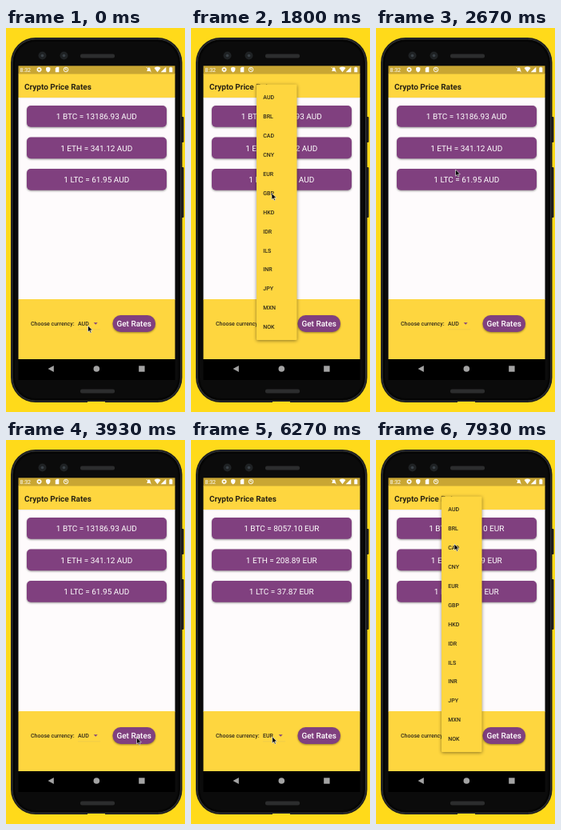
Recreate the animation shown at these times as an HTML page. Size 224 by 480 pixels, loop 8000 ms.

```html
<!DOCTYPE html>
<html lang="en">
<head>
<meta charset="utf-8">
<title>Crypto Price Rates</title>
<style>
  html, body { margin: 0; width: 100%; height: 100%; overflow: hidden; background: #ffda1a; }
  svg { display: block; width: 100vw; height: 100vh; }
  text { font-family: Roboto, Arial, sans-serif; text-rendering: geometricPrecision; }
  .rate { font-size: 10px; fill: #fff; text-anchor: middle; }
  .item { font-size: 7px; font-weight: 500; fill: #2b2618; }
  .card { filter: drop-shadow(0 1px 1.2px rgba(0, 0, 0, .4)); }
  #menu { filter: drop-shadow(0 1.5px 2px rgba(0, 0, 0, .45)); }
</style>
</head>
<body>
<svg viewBox="0 0 224 480">
  <!-- phone body -->
  <g id="phone">
    <rect x="218" y="111" width="4.500" height="32" rx="1" fill="#1c1c1c"/>
    <rect x="218" y="174" width="4.500" height="63" rx="1" fill="#1c1c1c"/>
    <rect x="6" y="12" width="214.500" height="456" rx="31" fill="#1b1c1d"/>
    <rect x="8" y="14" width="210.500" height="452" rx="29" fill="#050505" stroke="#3c3e40" stroke-width=".8"/>
    <rect x="11" y="17" width="204.500" height="446" rx="26" fill="#0b0b0b"/>
    <rect x="102" y="467" width="22" height="1.500" fill="#ffda1a"/>
    <rect x="93" y="32.500" width="43" height="5" rx="2" fill="#2c2d2e"/>
    <rect x="93" y="451.500" width="43" height="5" rx="2" fill="#2c2d2e"/>
    <g fill="#1f2224">
      <circle cx="45.500" cy="34.500" r="5"/>
      <circle cx="72.500" cy="34.500" r="5"/>
    </g>
    <g fill="#3a4147">
      <circle cx="45.500" cy="34.500" r="1.800"/>
      <circle cx="72.500" cy="34.500" r="1.800"/>
    </g>
  </g>

  <!-- app surfaces -->
  <rect x="15.500" y="47.300" width="196" height="10.500" fill="#c9a633"/>
  <rect x="15.500" y="57.300" width="196" height="30" fill="#fed63f"/>
  <rect x="15.500" y="87" width="196" height="252.500" fill="#fefbfc"/>
  <rect x="15.500" y="87" width="196" height="1" fill="#000" opacity=".05"/>
  <rect x="15.500" y="339" width="196" height="75" fill="#fed63f"/>
  <rect x="15.500" y="414" width="196" height="26" fill="#000"/>

  <!-- status bar -->
  <g fill="#fff">
    <text x="17.500" y="55" font-size="7">8:32</text>
    <circle cx="41.500" cy="52" r="2" fill="none" stroke="#fff" stroke-width="1.300"/>
    <circle cx="41.500" cy="52" r="2.900" fill="none" stroke="#fff" stroke-width=".8" stroke-dasharray="1.140"/>
    <path d="M52.700 48.700l2.700 1v2.300q0 2.300-2.700 3.400q-2.700-1.100-2.700-3.400v-2.300z"/>
    <path d="M61.800 50.500l1.600-1.700h2.900v6.500h-4.500z"/>
    <circle cx="75" cy="52" r="2.800" fill="none" stroke="#fff" stroke-width=".9"/>
    <path d="M73.500 50.700l3 2.600M75 50v2" stroke="#fff" stroke-width=".8"/>
    <path d="M176 54q1-1 1-2.500q0-2 1.800-2.200q1.800.2 1.800 2.200q0 1.500 1 2.500z"/>
    <path d="M175.700 49l6 6.300" stroke="#fff" stroke-width=".8"/>
    <path d="M185.500 50q4-2.800 8 0l-4 5.300z"/>
    <path d="M200.300 48.700v6.600h-6.600z"/>
    <path d="M204.300 49.500h1.200v-.8h1.600v.8h1.200v5.800h-4z"/>
  </g>

  <text x="23" y="76.500" font-size="10" font-weight="700" fill="#292313">Crypto Price Rates</text>
  <g id="cards"></g>

  <!-- bottom panel -->
  <text class="item" x="31" y="372">Choose currency:</text>
  <text class="item" id="choice" x="90" y="372"></text>
  <path d="M109.700 368.200h5l-2.500 2.600z" fill="#81407f"/>
  <path d="M90 376.800h28" stroke="#c9b56a" stroke-width=".5" opacity=".5"/>
  <rect class="card" x="133.500" y="359" width="53.500" height="21" rx="10" fill="#80407f"/>
  <text x="160.200" y="373" font-size="10" font-weight="500" fill="#fff" text-anchor="middle">Get Rates</text>

  <!-- navigation bar -->
  <g fill="#a3a3a3">
    <path d="M59.800 422v8l-7.300-4z"/>
    <circle cx="113.300" cy="426" r="3.800"/>
    <rect x="166.200" y="422.300" width="7.400" height="7.400"/>
  </g>

  <g id="menu">
    <rect id="sheet" x="82" width="50.500" rx="1" fill="#fed63f"/>
    <g id="items"></g>
  </g>

  <path id="cursor" d="M0 0v8l1.900-1.700l1.300 2.900l1.300-.6l-1.300-2.800h2.600z"
        fill="#000" stroke="#fff" stroke-width=".6"/>
</svg>
<script>
const LOOP = 8000, TICK = 1000 / 15, FADE = 75;
const MENU_TOP = 70.5, MENU_BOTTOM = 390, ROW = 23.9, ALL_ROWS = 21;
const CODES = "AUD BRL CAD CNY EUR GBP HKD IDR ILS INR JPY MXN NOK".split(" ");
const COINS = ["BTC", "ETH", "LTC"];
const RATES = { AUD: ["13186.93", "341.12", "61.95"], EUR: ["8057.10", "208.89", "37.87"] };
const RATES_AT = 4800;
const MENUS = [{ open: 320, close: 2420 }, { open: 6510, close: LOOP }];

// time, x, y of the pointer
const PATH = [
  [0, 102.5, 372], [930, 102.5, 372], [1800, 101, 206.5], [2200, 99.5, 180],
  [2667, 99.5, 177], [2900, 100, 178], [3800, 163.5, 372], [4330, 163.5, 372],
  [4400, 162, 372], [5300, 162, 372], [6070, 102, 372], [6450, 101.5, 370],
  [7000, 101.5, 370], [7900, 98, 130], [8000, 98, 130]
];

const $ = id => document.getElementById(id);
const clamp = v => Math.max(0, Math.min(1, v));
const mix = (a, b, p) => a + (b - a) * p;
const span = (p, a, b) => clamp((p - a) / (b - a));
const ease = p => p * p * (3 - 2 * p);

function add(parent, tag, attrs, text = "") {
  const el = document.createElementNS(parent.namespaceURI, tag);
  for (const key in attrs) el.setAttribute(key, attrs[key]);
  el.textContent = text;
  return parent.appendChild(el);
}

const rateTexts = COINS.map((coin, i) => {
  const y = 97 + i * 39.5;
  add($("cards"), "rect", { class: "card", x: 26, y, width: 175, height: 26.7, rx: 5, fill: "#80407f" });
  return add($("cards"), "text", { class: "rate", x: 113.3, y: y + 17.3 });
});
const rows = CODES.map((code, i) =>
  add($("items"), "text", { class: "item", x: 90.3, y: 89.3 + i * ROW }, code));

function pointer(t) {
  const i = Math.max(1, PATH.findIndex(p => p[0] >= t));
  const [t0, x0, y0] = PATH[i - 1], [t1, x1, y1] = PATH[i];
  const p = ease(span(t, t0, t1));
  return [mix(x0, x1, p), mix(y0, y1, p)];
}

// fade in, unroll from the selected row, then reveal the rows in turn
function drawMenu(t, selected) {
  const run = MENUS.find(m => t >= m.open && t < m.close + FADE);
  $("menu").style.display = run ? "" : "none";
  if (!run) return;
  const p = clamp((t - run.open) / 300);
  const grow = ease(span(p, .25, .5));
  const start = MENU_TOP + 4 + selected * ROW;
  const top = mix(start, MENU_TOP, grow);
  $("sheet").setAttribute("y", top);
  $("sheet").setAttribute("height", mix(start + ROW, MENU_BOTTOM, grow) - top);
  $("menu").style.opacity = span(p, 0, .25) * (1 - span(t, run.close, run.close + FADE));
  const unit = .5 / (ALL_ROWS + 1.5);
  rows.forEach((row, i) => {
    const from = .5 + (i + 1) * unit;
    row.style.opacity = i === selected ? 1 : span(p, from, from + 1.5 * unit);
  });
}

function draw(t) {
  const code = t < RATES_AT ? "AUD" : "EUR";
  $("choice").textContent = code;
  rateTexts.forEach((el, i) => {
    el.textContent = `1 ${COINS[i]} = ${RATES[code][i]} ${code}`;
  });
  drawMenu(t, CODES.indexOf(code));
  $("cursor").setAttribute("transform", `translate(${pointer(t)})`);
}

function loop(now) {
  draw(Math.floor(((now % LOOP) + 4) / TICK) * TICK % LOOP);
  requestAnimationFrame(loop);
}
draw(0);
requestAnimationFrame(loop);
</script>
</body>
</html>
```
